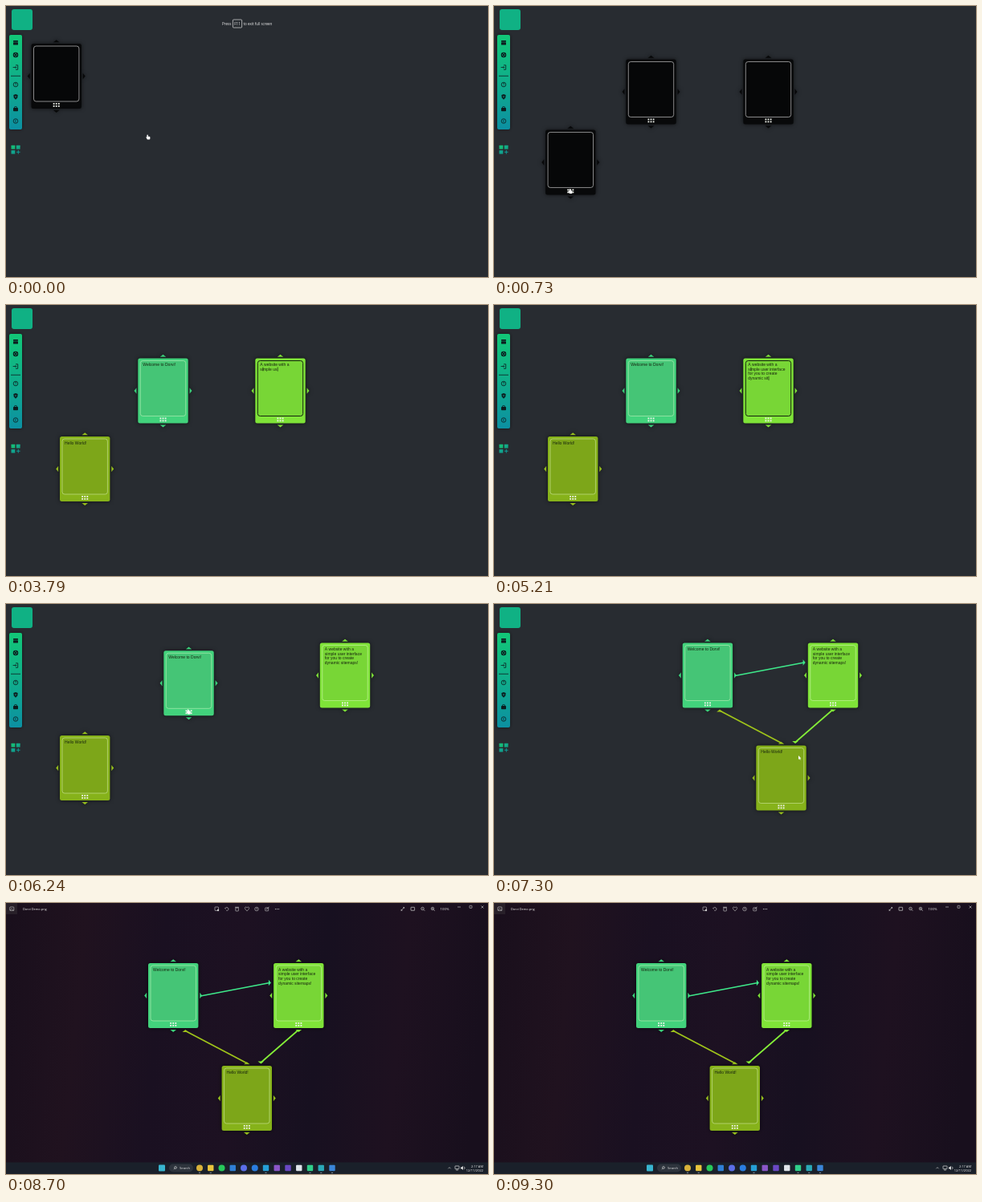
Recreate the animation shown at these times as an HTML page with a canvas. Size 600 px wide and 338 px high, loop 9.33 s.

```html
<!DOCTYPE html>
<html lang="en">
<head>
<meta charset="utf-8">
<title>Sitemap builder demo</title>
<style>
html, body { margin: 0; width: 100%; height: 100%; overflow: hidden; background: #282c31; }
canvas { display: block; }
</style>
</head>
<body>
<canvas id="stage" width="600" height="338"></canvas>
<script>
const g = document.getElementById('stage').getContext('2d');
const LOOP = 9330, CHAR_MS = 33.8, DIALOG = 7750, VIEWER = 8520;
const ARIAL = '"Liberation Sans", Arial, sans-serif';
const UI = '"Open Sans", "Noto Sans", sans-serif';

// Each key is [time, x, y]; motion between keys is eased.
function at(keys, t) {
  let i = keys.findIndex(k => k[0] > t);
  if (i < 0) i = keys.length;
  if (!i) return keys[0].slice(1);
  const a = keys[i - 1], b = keys[i] || a;
  let p = b === a ? 0 : (t - a[0]) / (b[0] - a[0]);
  p = p * p * (3 - 2 * p);
  return [a[1] + (b[1] - a[1]) * p, a[2] + (b[2] - a[2]) * p];
}

const cards = [
  { color: '#45c576', edge: '#42d27c', port: '#3fe083', paint: 1150, born: 310,
    text: ['Welcome to Dorvi!'], type: 1800, end: 2400,
    path: [[335, 31.5, 47], [525, 164.3, 66.5], [6100, 164.3, 66.5], [6400, 234.7, 48.5]] },
  { color: '#78d636', edge: '#7fe338', port: '#86f03c', paint: 1300, born: 0,
    text: ['A website with a', 'simple user interface', 'for you to create', 'dynamic sitemaps!'],
    type: 2880, end: 5500,
    path: [[100, 31.5, 47], [300, 310.3, 66.5], [5670, 310.3, 66.5], [5950, 390.8, 48.5]] },
  { color: '#7da619', edge: '#86b21a', port: '#a0cc20', paint: 1000, born: 545,
    text: ['Hello World!'], type: 1350, end: 1800,
    path: [[562, 31.5, 47], [767, 67, 164], [6500, 67, 164], [6840, 326.3, 176.5]] }
];
const links = [
  { start: 6870, end: 6980, from: [357, 173], to: [281, 133], dir: 0, color: '#9fc41a' },
  { start: 7020, end: 7110, from: [300, 89.5], to: [386, 73], dir: 1, color: '#3ee88a' },
  { start: 7150, end: 7250, from: [421.5, 132], to: [375, 172.5], dir: 2, color: '#84ee38' }
];
const pointer = [
  [0, 177, 163], [100, 62, 123], [300, 341, 142], [318, 12, 179], [335, 62, 123],
  [525, 195, 142], [545, 12, 179], [562, 62, 123], [767, 98, 240], [1000, 98, 200],
  [1150, 195, 107], [1300, 341, 107], [1380, 98, 185], [1770, 98, 185], [1830, 195, 85],
  [2390, 195, 85], [2450, 253, 76], [2700, 320, 80], [5500, 320, 80], [5670, 341, 142],
  [5950, 422, 124], [6100, 195, 142], [6400, 266, 124], [6500, 98, 240], [6840, 357, 252],
  [6870, 357, 173], [6980, 281, 133], [7020, 300, 89.5], [7110, 386, 73],
  [7150, 421, 132], [7250, 375, 173], [7300, 379, 190], [7600, 14, 128]
];

function text(s, x, y, size = 4, color = '#ddd', font = UI, align = 'left') {
  g.font = size + 'px ' + font;
  g.textAlign = align;
  g.fillStyle = color;
  g.fillText(s, x, y);
}
function box(x, y, w, h, fill, r = 0, stroke, lw = 0.7) {
  g.beginPath();
  g.roundRect(x, y, w, h, r);
  if (fill) { g.fillStyle = fill; g.fill(); }
  if (stroke) { g.strokeStyle = stroke; g.lineWidth = lw; g.stroke(); }
}
function dot(x, y, r, fill, stroke, lw = 0.8) {
  g.beginPath();
  g.arc(x, y, r, 0, 7);
  if (fill) { g.fillStyle = fill; g.fill(); }
  if (stroke) { g.strokeStyle = stroke; g.lineWidth = lw; g.stroke(); }
}
function line(points, color, w = 0.7) {
  g.beginPath();
  points.forEach(p => g.lineTo(p[0], p[1]));
  g.strokeStyle = color;
  g.lineWidth = w;
  g.stroke();
}
function poly(points, fill) {
  g.beginPath();
  points.forEach(p => g.lineTo(p[0], p[1]));
  g.closePath();
  g.fillStyle = fill;
  g.fill();
}
// dir counts quarter turns clockwise from up
function triangle(x, y, dir, color) {
  g.save();
  g.translate(x, y);
  g.rotate(dir * Math.PI / 2);
  poly([[-3.8, 1.4], [0, -1.6], [3.8, 1.4]], color);
  g.restore();
}
function chevron(x, y, dir, color = '#ccc', s = 1.3) {
  g.save();
  g.translate(x, y);
  g.rotate(dir * Math.PI / 2);
  line([[-s, s / 2], [0, -s / 2], [s, s / 2]], color, 0.6);
  g.restore();
}

function drawCard(c, t) {
  if (t < c.born) return;
  const [x, y] = at(c.path, t), w = 62.4, h = 81, dark = t < c.paint;
  const focus = t >= c.type - 60 && t < c.end;
  const port = dark ? '#08090a' : c.port;
  g.save();
  g.shadowColor = 'rgba(0,0,0,.65)';
  g.shadowBlur = 5;
  triangle(x + w / 2, y - 3.2, 0, port);
  triangle(x + w + 3.2, y + h / 2, 1, port);
  triangle(x + w / 2, y + h + 3.4, 2, port);
  triangle(x - 3.2, y + h / 2, 3, port);
  box(x, y, w, h, dark ? '#08090a' : c.edge, 2.5);
  g.restore();
  box(x + 3, y + 3, w - 6, 69, dark ? '#060708' : c.color, 3,
    focus ? '#15230e' : dark ? 'rgba(225,225,225,.75)' : 'rgba(235,255,210,.55)', focus ? 1 : 0.8);
  for (let i = 0; i < 6; i++)
    box(x + w / 2 - 4 + i % 3 * 3.1, y + 74 + (i > 2) * 3, 1.8, 1.8, '#f2f5ee');
  if (dark) return;

  const lines = t < c.type ? ['Content'] : c.text;
  let left = t < c.type ? 99 : Math.floor((t - c.type) / CHAR_MS);
  for (let i = 0; i < lines.length && left >= 0; i++) {
    const s = lines[i].slice(0, left), by = y + 9.7 + i * 5.6;
    text(s, x + 6, by, 5, '#17240f', ARIAL);
    if (focus && left <= lines[i].length)
      box(x + 6.4 + g.measureText(s).width, by - 4.3, 0.6, 5.2, '#111');
    left -= lines[i].length + 1;
  }
}

function drawMap(t, dx, dy) {
  g.save();
  g.translate(dx, dy);
  cards.forEach(c => drawCard(c, t));
  for (const l of links) {
    if (t < l.start) continue;
    const end = at([[l.start, ...l.from], [l.end, ...l.to]], t);
    line([l.from, end], l.color, 1.7);
    triangle(end[0], end[1], l.dir, l.color);
  }
  g.restore();
}

function drawSidebar() {
  box(7, 4, 26, 26, '#10b184', 3);
  const grad = g.createLinearGradient(0, 36, 0, 154);
  grad.addColorStop(0, '#12c777');
  grad.addColorStop(.5, '#10ad8b');
  grad.addColorStop(1, '#0c90a2');
  g.save();
  g.shadowColor = 'rgba(0,0,0,.5)';
  g.shadowBlur = 4;
  box(4, 36, 16, 118, grad, 2);
  g.restore();
  const ink = '#0d1d1f';
  box(9, 43, 6, 1.8, ink, .5);
  box(9, 45.3, 6, 3.2, ink, .5);
  dot(12, 61, 2.7, null, ink, 1.1);
  line([[10, 59], [14, 63]], ink, 1.1);
  line([[14, 59], [10, 63]], ink, 1.1);
  line([[12, 73.8], [14.7, 73.8], [14.7, 79.3], [12, 79.3]], ink, .8);
  line([[8.6, 76.5], [12.6, 76.5]], ink, .8);
  chevron(12.2, 76.5, 1, ink, 1.5);
  box(6, 86.8, 12, .8, ink);
  dot(12, 98, 2.8, null, ink);
  text('?', 12, 99.7, 4.5, ink, ARIAL, 'center');
  poly([[9.3, 111], [12, 110], [14.7, 111], [14.2, 114.5], [12, 116.7], [9.8, 114.5]], ink);
  box(11.5, 112, 1, 2.2, '#10a094');
  box(9, 127, 6, 4.2, ink, .7);
  box(10.6, 125.6, 2.8, 2, null, .5, ink, .8);
  dot(12, 143.5, 2.8, null, ink);
  text('c', 12, 145, 4.5, ink, ARIAL, 'center');
  box(6.5, 173.8, 4.8, 4.6, '#14b978', .5);
  box(12.8, 173.8, 4.8, 4.6, '#12a986', .5);
  box(6.5, 180, 4.8, 4.6, '#11a28c', .5);
  line([[13, 182.2], [17.6, 182.2]], '#0f9b96', 1);
  line([[15.3, 179.9], [15.3, 184.5]], '#0f9b96', 1);
}

function drawPointer(t) {
  const [x, y] = at(pointer, t);
  g.save();
  g.translate(x, y);
  if (t < 800 || t >= 5640 && t < 6850) {
    box(-1.5, -2.5, 1.4, 4, '#fff', .7);
    box(-1.6, -.3, 4, 3.9, '#fff', 1);
    line([[-2.3, .3], [-.5, 2.6]], '#fff', 1.1);
  } else if (t >= 2650 && t < 5550) {
    line([[0, -2.5], [0, 2.5]], '#1a2a10', .6);
  } else {
    poly([[0, -1], [0, 4], [1.1, 3], [2, 4.6], [2.8, 4.2], [2, 2.7], [3.4, 2.5]], '#fff');
  }
  g.restore();
}

function drawHint(t) {
  if (t > 300) return;
  g.globalAlpha = 1 - Math.max(0, t - 60) / 240;
  text('Press', 269, 23.5, 4.5, '#eee');
  box(282.4, 17, 11.2, 10, null, 1, '#ddd', .7);
  text('F11', 288, 23.6, 4.5, '#eee', UI, 'center');
  text('to exit full screen', 295.5, 23.5, 4.5, '#eee');
  g.globalAlpha = 1;
}

function drawTaskbar(x, bg, clock, viewer) {
  box(0, 323.5, 600, 14.5, bg);
  box(x - 4, 326.5, 8, 8, '#38b5cf', 1);
  box(x + 9, 325.5, 30, 10, 'rgba(255,255,255,.09)', 5);
  dot(x + 17, 330, 1.4, null, '#ddd', .6);
  line([[x + 16, 331], [x + 14.8, 332.2]], '#ddd', .6);
  text('Search', x + 22, 332, 4.2, '#ddd');
  const icons = ['#d8b23a', '#e8c53c', '#27c85a', '#2f7fd6', '#5b6ee8', '#2a7de0',
    '#259fd6', '#8a56c8', '#6a48c4', '#dfe5ea', '#2fd08a', '#2aa9b8', '#3a86d8'];
  icons.slice(0, viewer ? 13 : 12).forEach((c, i) => {
    const cx = x + 47 + i * 13.75;
    if ([0, 2, 4, 5].includes(i)) dot(cx, 330.5, 4, c);
    else box(cx - 3.7, 326.8, 7.4, 7.4, c, 1);
    if (i < 2 || i === 6 || i > 9) box(cx - 1.2, 336.3, 2.4, .8, '#9ab0bf', .4);
  });
  chevron(552, 330.5, 0, '#ddd', 1.6);
  box(559, 328, 5, 3.7, null, .4, '#ddd', .7);
  line([[560, 333], [563, 333]], '#ddd');
  poly([[566, 329.5], [567.3, 329.5], [569, 328], [569, 333], [567.3, 331.5], [566, 331.5]], '#ddd');
  g.beginPath(); g.arc(569, 330.5, 2, -1, 1); g.strokeStyle = '#ddd'; g.stroke();
  text(clock, 594, 329.5, 4, '#eee', UI, 'right');
  text('12/11/2022', 594, 334.8, 4, '#eee', UI, 'right');
}

function drawDialog(t) {
  g.save();
  g.shadowColor = 'rgba(0,0,0,.7)';
  g.shadowBlur = 8;
  box(2, 0, 296, 166.5, '#191919', 1);
  g.restore();
  box(2, 0, 296, 10, '#1e2022');
  dot(7, 5, 1.8, '#c8a93c');
  text('Save As', 11.5, 6.4, 3.8);
  line([[291.5, 3.5], [294.5, 6.5]], '#ccc');
  line([[294.5, 3.5], [291.5, 6.5]], '#ccc');
  [9, 19].forEach((x, i) => {
    line([[x - 2, 18], [x + 2, 18]], i ? '#777' : '#ddd');
    chevron(x + (i ? 1.4 : -1.4), 18, i ? 1 : 3, i ? '#777' : '#ddd');
  });
  chevron(30, 18, 2);
  chevron(38, 16.8, 0); line([[38, 16], [38, 20.3]], '#ccc');
  box(45, 13, 182, 10, '#191919', 0, '#444', .6);
  box(48, 15.5, 5.5, 4.5, '#86c94a', .5);
  [[56, 'This PC', 60], [75, 'Storage (D:)', 79], [101.5, 'GoogleDownloads', 105.5]].forEach(([cx, s, x]) => {
    chevron(cx, 18, 1, '#bbb', 1);
    text(s, x, 19.5, 3.9, '#e6e6e6');
  });
  chevron(209, 18, 2);
  g.beginPath(); g.arc(220.5, 18, 1.8, 0, 5.2); g.strokeStyle = '#ccc'; g.lineWidth = .6; g.stroke();
  box(231, 13, 63, 10, '#191919', 0, '#444', .6);
  dot(237, 17.7, 1.3, null, '#aaa', .5);
  text('Search GoogleDownloads', 242, 19.4, 3.7, '#999');
  text('Organise', 8, 33, 3.9); chevron(26, 31.6, 2, '#bbb', .9);
  text('New folder', 36.5, 33, 3.9);
  box(268, 29, 5, 4, '#ddd', .3);
  chevron(278, 31.5, 2, '#bbb', .9);
  dot(290.5, 31.5, 2.6, '#2089cf');
  text('?', 290.5, 33, 3.8, '#fff', UI, 'center');

  box(2, 37, 50, 92, '#171819');
  box(52, 37, 246, 92, '#111213');
  box(52, 37, .5, 92, '#333');
  text('No items match your search.', 175, 45, 3.9, '#ddd', UI, 'center');
  ['Videos', 'Desktop', 'GoogleDownlo', 'onlinedownlo', 'public', 'Components'].forEach((s, i) => {
    const y = 41.5 + i * 10;
    box(13, y - 2, 4.5, 4, ['#a45be0', '#2ea2cf'][i] || '#e5c555', .5);
    text(s, 19.5, y + 1.4, 3.8);
    if (i < 2) { line([[42, y + 1.5], [44.5, y - 1]], '#aaa', .8); }
  });
  chevron(7.5, 111.5, 2); box(13, 109.5, 5, 3.6, '#2ba6c5', .4);
  text('This PC', 20, 113, 3.8);
  chevron(10.5, 121.5, 1); box(16, 120, 5, 3, '#8bb9cc', .4);
  text('Local Disk (C:)', 22, 123, 3.7);
  box(48.2, 74, .8, 42, '#999');

  box(2, 129.5, 296, 37, '#25282b', 1);
  text('File name', 40, 138, 3.8, '#ddd', UI, 'right');
  text('Save as type', 40, 146.5, 3.8, '#ddd', UI, 'right');
  box(42, 133.3, 253.5, 6.7, '#303336', 0, '#c8c8c8', .6);
  box(42, 141.5, 253.5, 6.7, '#303336', 0, '#666', .6);
  text('Dorvi Demo'.slice(0, Math.max(0, (t - 7880) / 33)), 43.5, 138, 3.8, '#eee');
  text('PNG image', 43.5, 146.3, 3.8, '#eee');
  chevron(293, 136.6, 2, '#bbb', .9);
  chevron(293, 144.8, 2, '#bbb', .9);
  chevron(8, 159, 0);
  text('Hide Folders', 12, 160.5, 3.8);
  box(234, 155, 26, 7.3, '#303336', .6, '#eee');
  box(265, 155, 27, 7.3, '#303336', .6, '#777');
  text('Save', 247, 160, 3.8, '#fff', UI, 'center');
  text('Cancel', 278.5, 160, 3.8, '#fff', UI, 'center');
}

function drawViewer(t) {
  const bg = g.createLinearGradient(0, 0, 600, 60);
  ['#190f1c', '#20121f', '#1a1021', '#1d1122', '#171020', '#1e1120', '#180f1d']
    .forEach((c, i) => bg.addColorStop(i / 6, c));
  box(0, 0, 600, 338, bg);
  box(0, 0, 14, 14, '#282029');
  box(4.8, 5, 5, 4.5, null, .6, '#ccc', .6);
  line([[5, 9], [7, 7], [9.6, 9.3]], '#ccc', .5);
  text('Dorvi Demo.png', 21, 9, 3.9, '#eee');
  const ink = '#ccc';
  box(260, 5, 4.5, 4.5, null, .6, ink, .6); dot(264, 9, 1.2, ink);
  g.beginPath(); g.arc(275, 7.5, 2, -2.6, 2); g.strokeStyle = ink; g.stroke();
  chevron(273, 6.6, 3, ink, 1);
  box(285.8, 6, 3.6, 4, null, .4, ink, .6); line([[285, 5.3], [290, 5.3]], ink);
  g.beginPath(); g.moveTo(300, 10);
  g.bezierCurveTo(295, 6, 298.5, 3.5, 300, 6); g.bezierCurveTo(301.5, 3.5, 305, 6, 300, 10);
  g.strokeStyle = '#aaa'; g.stroke();
  dot(312, 7.5, 2.3, null, ink, .6); line([[312, 6], [312, 7.6], [313, 7.6]], ink, .5);
  box(322.7, 5.8, 4, 4, null, .5, ink, .6); line([[324, 8], [327.5, 5]], ink);
  [335.5, 337.5, 339.5].forEach(x => dot(x, 7.6, .6, ink));
  line([[491.7, 9.5], [496, 5.3]], ink); chevron(495.3, 5.8, .5, ink, 1); chevron(492.4, 9, 2.5, ink, 1);
  box(504, 5.3, 4.6, 4, null, .3, ink, .7);
  [518.5, 531].forEach((x, i) => {
    dot(x, 7, 1.8, null, ink, .6);
    line([[x + 1.3, 8.3], [x + 2.8, 9.8]], ink);
    line([[x - 1, 7], [x + 1, 7]], ink, .5);
    if (i) line([[x, 6], [x, 8]], ink, .5);
  });
  text('100%', 546, 9, 4.3, '#eee', UI, 'center');
  line([[562, 5], [566, 5]], ink, .6);
  box(577, 3.3, 3, 3, null, .3, ink, .6);
  line([[591.5, 3.5], [594.5, 6.5]], ink, .6);
  line([[594.5, 3.5], [591.5, 6.5]], ink, .6);
  drawMap(t, -57.7, 26.5);
  drawTaskbar(194, '#1a202a', '2:17 AM', true);
}

function frame(now) {
  const t = now % LOOP;
  g.clearRect(0, 0, 600, 338);
  if (t >= VIEWER) {
    drawViewer(t);
  } else {
    box(0, 0, 600, 338, '#282c31');
    const saving = t >= 7650;
    if (!saving) { drawSidebar(); drawHint(t); }
    drawMap(t, saving ? -57.7 : 0, saving ? 17.5 : 0);
    if (t >= DIALOG) {
      drawDialog(t);
      drawTaskbar(201, '#1b1f24', '2:16 AM', false);
    } else if (!saving) {
      drawPointer(t);
    }
  }
  requestAnimationFrame(frame);
}
requestAnimationFrame(frame);
</script>
</body>
</html>
```
